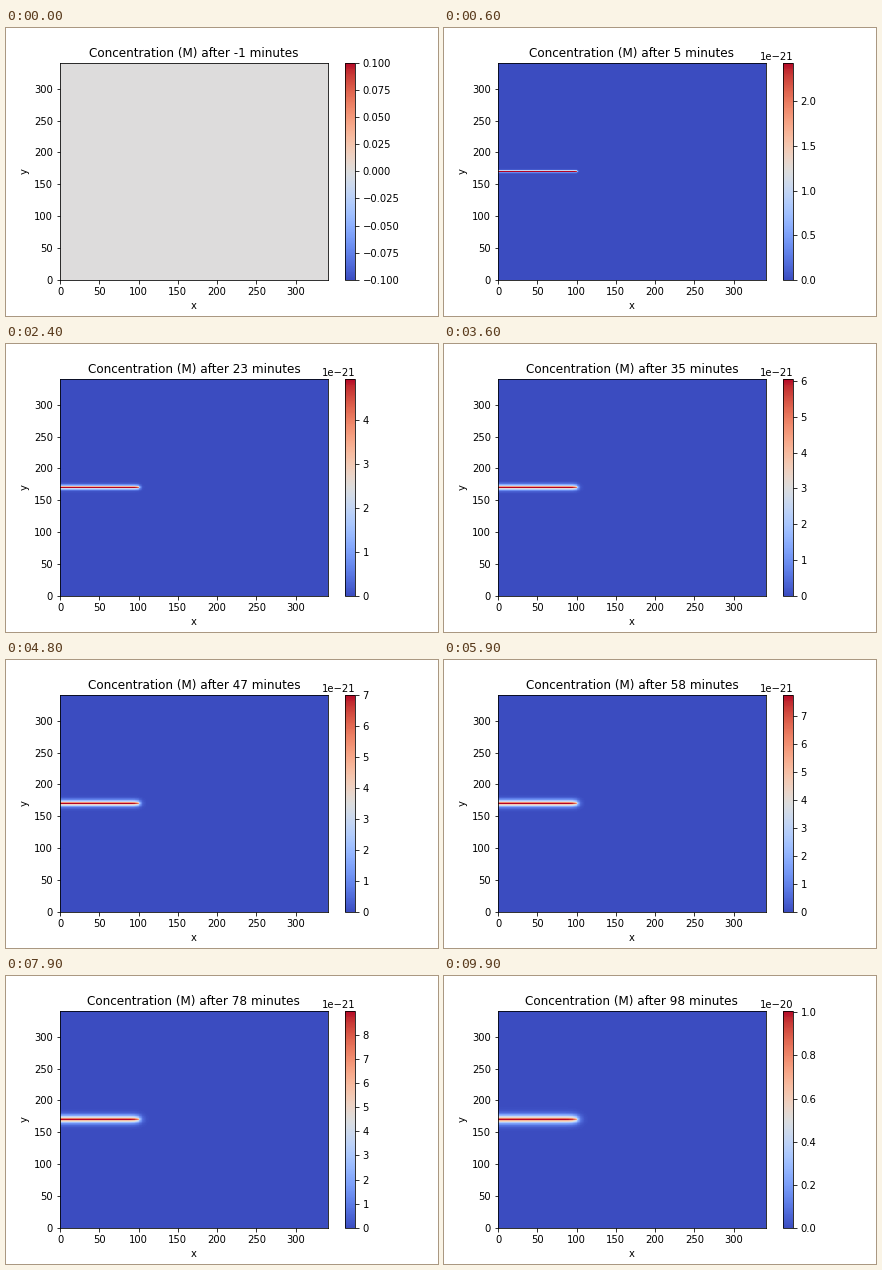
Write a matplotlib script that moves like this. It is 432 px wide and 288 px high and loops after 10000 ms.

```python
import numpy as np
import matplotlib.pyplot as plt
from matplotlib.animation import FuncAnimation

SIZE = 341                  # cells per side
MID = SIZE // 2             # row of the feeding line
REACH = 32                  # rows simulated on either side of the line
COLS = 140                  # columns simulated from the left wall
LINE_LEN = 101
RATE = 8.985e-22            # added to each line cell per minute
FRAMES = 100


def diffuse(u):
    """One step at the stability limit: each cell takes its neighbours' mean."""
    p = np.pad(u, 1, mode="edge")
    return (p[:-2, 1:-1] + p[2:, 1:-1] + p[1:-1, :-2] + p[1:-1, 2:]) / 4


def simulate():
    u = np.zeros((2 * REACH + 1, COLS))
    states = [u]
    for _ in range(FRAMES - 1):
        u = diffuse(u)
        u[REACH, :LINE_LEN] += RATE
        states.append(u)
    return states


states = simulate()

fig, ax = plt.subplots(figsize=(6, 4), dpi=72)
fig.subplots_adjust(left=0.125, right=0.9, bottom=0.125, top=0.88)

x = np.arange(COLS + 1)
y = np.arange(MID - REACH, MID + REACH + 2)
mesh = ax.pcolormesh(x, y, states[0], cmap="coolwarm", vmin=-0.1, vmax=0.1)
ax.set(xlim=(0, SIZE), ylim=(0, SIZE), xlabel="x", ylabel="y")
title = ax.set_title("")
cbar = fig.colorbar(mesh, ax=ax)
cbar.ax.yaxis.set_offset_position("right")


def update(i):
    u = states[i]
    peak = u.max()
    mesh.set_array(u)
    if peak > 0:
        mesh.set_clim(0, peak)
    else:
        mesh.set_clim(-0.1, 0.1)
    ax.set_facecolor(mesh.to_rgba(0.0))
    title.set_text(f"Concentration (M) after {i - 1} minutes")
    return mesh, title


anim = FuncAnimation(fig, update, frames=FRAMES, interval=100,
                     repeat=True, repeat_delay=0, blit=False)
plt.show()
```
